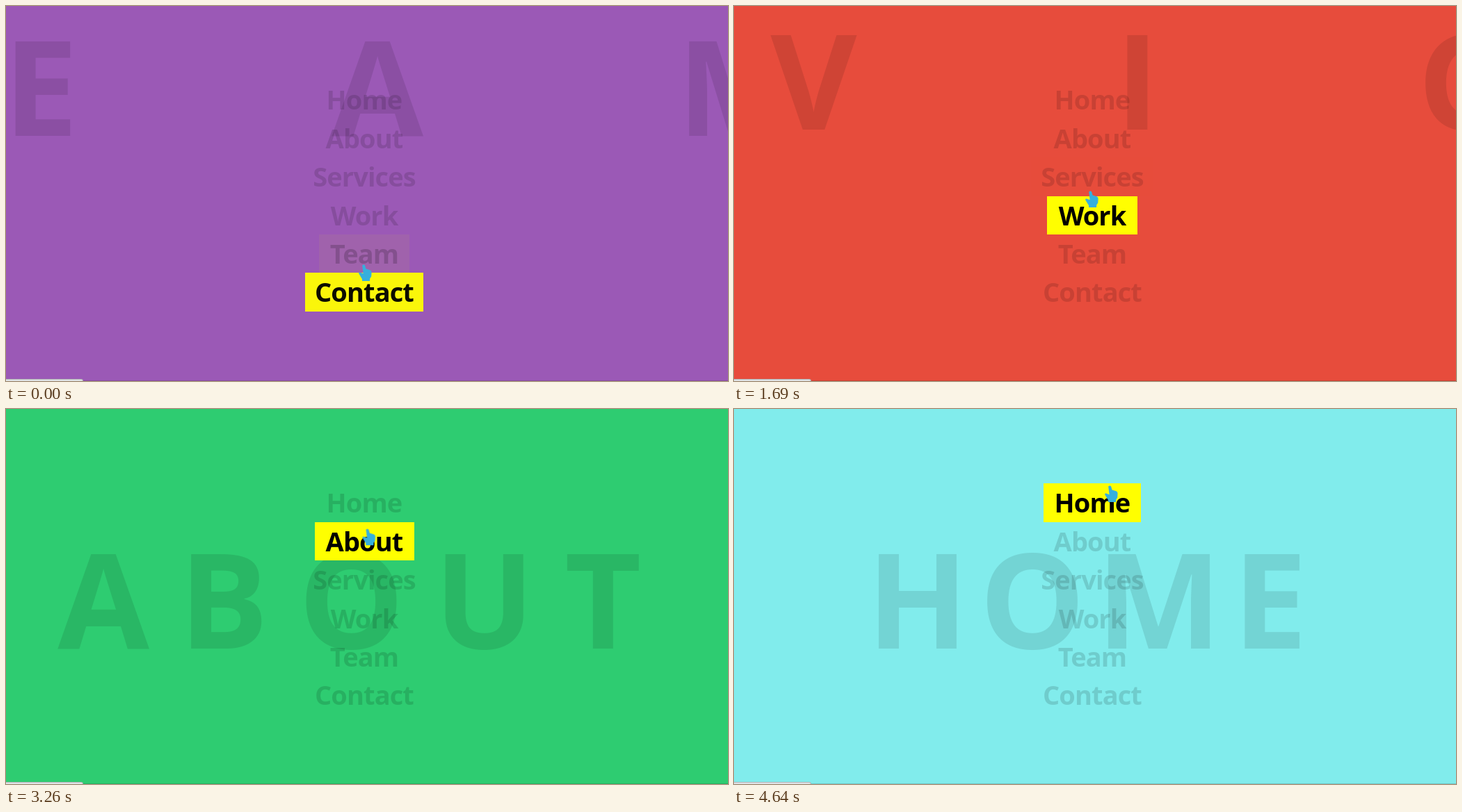
An HTML page that plays this animation: 1038 by 540 pixels, repeating every 4.7 s.

```html
<!DOCTYPE html>
<html lang="en">
<head>
<meta charset="utf-8">
<title>Hover menu</title>
<style>
@property --on { syntax: "<number>"; inherits: false; initial-value: 0; }

:root { --loop: 4.7s; }
html, body { margin: 0; width: 100%; height: 100%; overflow: hidden; }
body { position: relative; font: 700 38px "Open Sans", "Noto Sans", sans-serif; background: #9b59b6; }

/* Panels stack in order of hover, each one covering those before it */
.panel {
  position: absolute; inset: 0; overflow: hidden;
  background: var(--bg);
  animation: var(--show, none) var(--loop) step-end infinite;
}
.panel span {
  position: absolute; left: 515.5px; top: 176px; translate: -50%;
  font-size: 191px; line-height: 1; white-space: nowrap; font-kerning: none;
  color: rgb(0 0 0 / .1);
  animation: drop var(--loop) var(--at) infinite both, gather var(--loop) var(--at) infinite both;
}
@keyframes drop {
  0% { transform: translateY(-167px); }
  10.638%, to { transform: none; }
}
@keyframes gather {
  0% { letter-spacing: 372px; }
  21.277%, to { letter-spacing: 16px; }
}
@keyframes show-work { 0% { visibility: hidden; } 16.851% { visibility: visible; } }
@keyframes show-services { 0% { visibility: hidden; } 35.915% { visibility: visible; } }
@keyframes show-about { 0% { visibility: hidden; } 55.234% { visibility: visible; } }
@keyframes show-home { 0% { visibility: hidden; } 76.723% { visibility: visible; } }

ul {
  position: absolute; left: 415px; top: 107.4px; width: 200px;
  margin: 0; padding: 0; list-style: none;
}
li {
  width: var(--w); height: 55.4px; margin: 0 auto;
  line-height: 55.4px; letter-spacing: -.9px; white-space: nowrap;
  display: flex; justify-content: center;
  background: rgb(255 255 0 / var(--on));
  color: rgb(0 0 0 / calc(.133 + .867 * var(--on)));
  animation: var(--lit) var(--loop) ease infinite;
}
@keyframes lit-home {
  0%, 76.723% { --on: 0; }
  87.362%, to { --on: 1; }
}
@keyframes lit-about {
  0%, 55.234% { --on: 0; }
  65.872%, 76.723% { --on: 1; }
  87.362%, to { --on: 0; }
}
@keyframes lit-services {
  0%, 35.915% { --on: 0; }
  46.553%, 55.234% { --on: 1; }
  65.872%, to { --on: 0; }
}
@keyframes lit-work {
  0%, 16.851% { --on: 0; }
  27.489%, 35.915% { --on: 1; }
  46.553%, to { --on: 0; }
}
/* The loop opens 34 ms into this change, so its ease is cut there */
@keyframes lit-team {
  0% { --on: .052; animation-timing-function: cubic-bezier(.203, .231, .275, 1); }
  9.915%, 16.851% { --on: 1; }
  27.489%, to { --on: 0; }
}
@keyframes lit-contact {
  0% { --on: .948; animation-timing-function: cubic-bezier(.203, .231, .275, 1); }
  9.915%, to { --on: 0; }
}

.edge { position: absolute; left: 0; right: 0; bottom: 0; height: 1px; background: rgb(0 0 0 / .14); }
.status {
  position: absolute; left: 0; bottom: 0; width: 110px; height: 2px;
  background: #dfe2e5; border: solid rgb(120 120 120 / .45); border-width: 1px 1px 0 0;
  border-top-right-radius: 3px;
}

.hand {
  position: absolute; left: 0; top: 0; width: 20px; height: 26px; overflow: visible;
  fill: #36afdd;
  animation: move var(--loop) linear infinite;
}
@keyframes move {
  0% { transform: translate(514px, 372px); }
  10.64% { transform: translate(512px, 345px); }
  17.02% { transform: translate(510px, 325px); }
  21.28% { transform: translate(509px, 308px); }
  29.79% { transform: translate(510px, 290px); }
  35.96% { transform: translate(512px, 266px); }
  46.6% { transform: translate(516px, 243px); }
  55.32% { transform: translate(517px, 212px); }
  60% { transform: translate(517px, 190px); }
  72.13% { transform: translate(520px, 167px); }
  77.45% { transform: translate(524px, 149px); }
  85.53% { transform: translate(528px, 136px); }
  96.17% { transform: translate(536px, 121px); }
  98.72%, to { transform: translate(540px, 110px); }
}
</style>
</head>
<body>
<div class="panel" style="--bg:#9b59b6; --at:-34ms"><span>TEAM</span></div>
<div class="panel" style="--bg:#f1c40f; --at:792ms; --show:show-work"><span>WORK</span></div>
<div class="panel" style="--bg:#e74c3c; --at:1688ms; --show:show-services"><span>SERVICES</span></div>
<div class="panel" style="--bg:#2ecc71; --at:2596ms; --show:show-about"><span>ABOUT</span></div>
<div class="panel" style="--bg:#81ecec; --at:3606ms; --show:show-home"><span>HOME</span></div>

<ul>
  <li style="--w:140px; --lit:lit-home">Home</li>
  <li style="--w:143px; --lit:lit-about">About</li>
  <li style="--w:176px; --lit:lit-services">Services</li>
  <li style="--w:130px; --lit:lit-work">Work</li>
  <li style="--w:130px; --lit:lit-team">Team</li>
  <li style="--w:170px; --lit:lit-contact">Contact</li>
</ul>

<div class="edge"></div>
<div class="status"></div>
<svg class="hand" aria-hidden="true">
  <path d="M-1.8 1.6Q0-.6 2 1.2L3.6 6.6 9.4 8.2Q11.6 9 11.6 11.5L11.2 17.5 9.2 20.5 9 24H-2V21.2L-6.8 13.2Q-7.2 11.2-5 11.4L-.4 13.2Z"/>
</svg>
</body>
</html>
```
